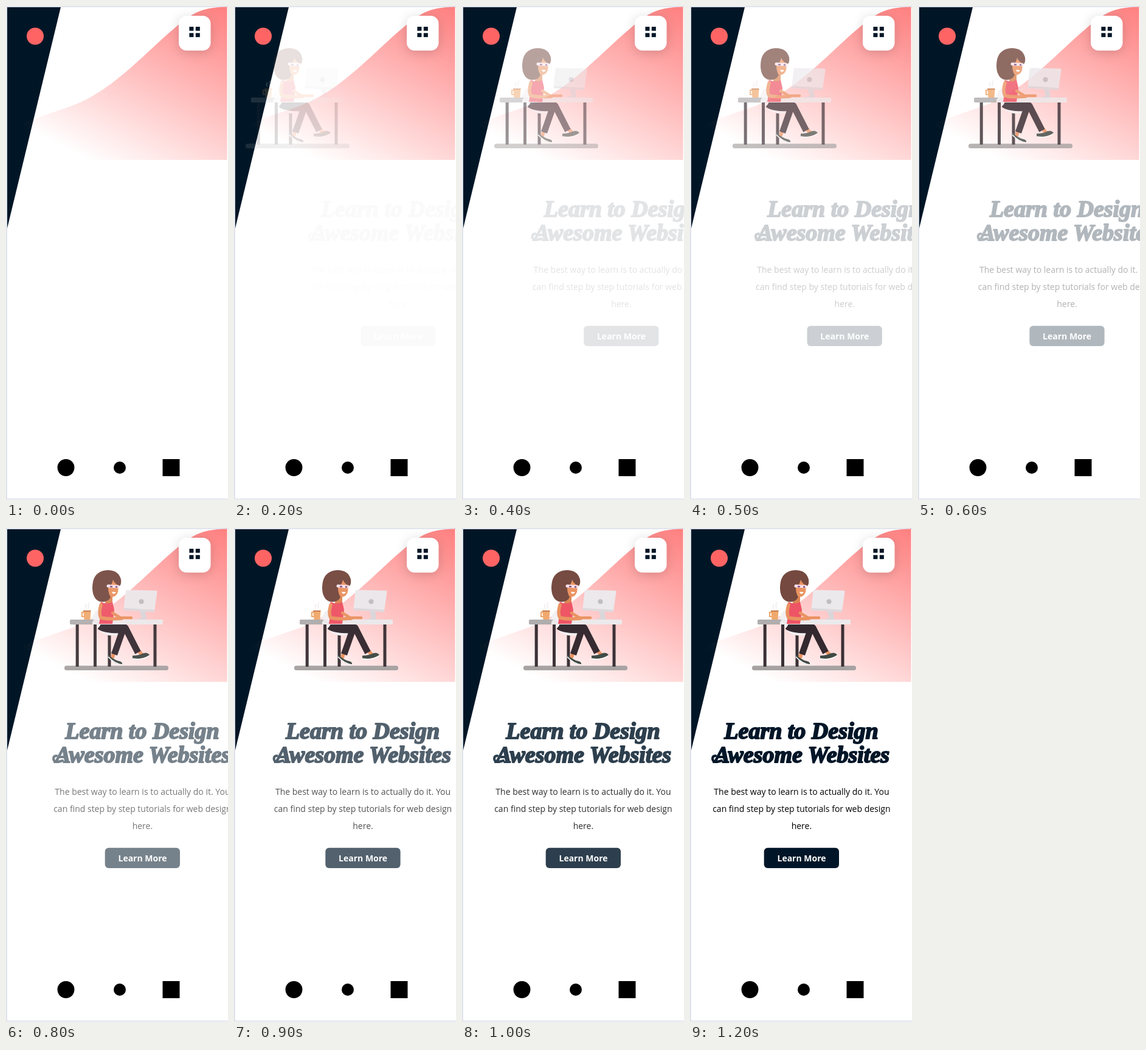
Recreate the animation shown at these times as an HTML page without scripts. Size 365x809 px, loop 3500 ms.

```html
<!DOCTYPE html>
<html lang="en">
<head>
<meta charset="utf-8">
<title>Learn to Design</title>
<style>
  @property --art { syntax: "<number>"; inherits: true; initial-value: 0; }
  @property --copy { syntax: "<number>"; inherits: true; initial-value: 0; }

  html, body { margin: 0; width: 100%; height: 100%; overflow: hidden; background: #fff; }
  svg { display: block; width: 100%; height: 100%; animation: enter 3500ms step-end infinite; }

  /* Both parts fade in while sliding; progress advances every 100 ms. */
  .art  { opacity: var(--art);  transform: translateX(calc((var(--art) - 1) * 100px)); }
  .copy { opacity: var(--copy); transform: translateX(calc((1 - var(--copy)) * 88px)); }

  @keyframes enter {
    0%     { --art: 0;    --copy: 0; }
    5.71%  { --art: .17;  --copy: .016; }
    8.57%  { --art: .34;  --copy: .054; }
    11.42% { --art: .51;  --copy: .108; }
    14.28% { --art: .68;  --copy: .195; }
    17.14% { --art: .81;  --copy: .3; }
    20%    { --art: .885; --copy: .412; }
    22.85% { --art: .94;  --copy: .534; }
    25.71% { --art: .97;  --copy: .675; }
    28.57% { --art: .99;  --copy: .818; }
    31.42% { --art: .997; --copy: .935; }
    34.28%, 100% { --art: 1; --copy: 1; }
  }

  text { text-anchor: middle; font-family: "Open Sans", "Noto Sans", sans-serif; font-size: 14px; }
  .title text {
    font: italic bold 38px "Liberation Serif", "Times New Roman", serif;
    fill: #001628; stroke: #001628; stroke-width: 2px; stroke-linejoin: round;
  }
  .swash { fill: none; stroke: #001628; stroke-width: 4; stroke-linecap: round; }
  .label { fill: #fff; font-weight: 700; }
  .card { fill: #fff; filter: drop-shadow(0 3px 9px rgba(0, 0, 0, .16)); }
  .limb { fill: none; stroke-linecap: round; stroke-linejoin: round; }
  .skin { stroke: #ea9360; }
  .trousers { stroke: #33292f; stroke-width: 10.5; stroke-linecap: butt; }
</style>
</head>
<body>
<svg viewBox="0 0 365 809" preserveAspectRatio="none">
  <defs>
    <linearGradient id="blush" gradientUnits="userSpaceOnUse" x1="130" y1="250" x2="276" y2="-42">
      <stop offset="0" stop-color="#ff6464" stop-opacity="0"/>
      <stop offset="1" stop-color="#ff6464" stop-opacity=".82"/>
    </linearGradient>
    <rect id="dot" width="7" height="6.6"/>
    <rect id="post" y="157" width="5" height="70"/>
  </defs>

  <!-- Backdrop -->
  <rect width="365" height="809" fill="#fff"/>
  <path d="M365 1H1V807.5H365" fill="none" stroke="#d9dce8" stroke-width="1.6"/>
  <path d="M2 2H90L2 364Z" fill="#001626"/>
  <path d="M22 196C52 181 86 172 112 162C190 132 252 48 307 14C321 5.500 340 1.500 363.500 1.500V252H22Z" fill="url(#blush)"/>
  <circle cx="48" cy="49.500" r="14" fill="#ff6464"/>

  <!-- Desk scene -->
  <g class="art">
    <rect x="102" y="225.5" width="171" height="7.5" rx="3.5" fill="#a7a2a2"/>
    <g fill="#3a3035">
      <use href="#post" x="120.700"/>
      <use href="#post" x="150"/>
      <use href="#post" x="173.500"/>
      <use href="#post" x="248.500"/>
    </g>

    <!-- Chair -->
    <path d="M146 157Q148 138 158 133L166 157H194L190 176H176Q158 173 155 158Z" fill="#f3f0f2"/>

    <!-- Legs and shoes -->
    <path class="limb skin" d="M184 203L181 212M224 201L230 208" stroke-width="6"/>
    <path class="limb trousers" d="M160 161Q168 168 198 167L184 207M160 161Q166 164 202 163L223 204"/>
    <path d="M174 207Q183 216 192 218Q198 219 197 224Q186 224 174 212Z" fill="#3f4a45"/>
    <path d="M174 211Q184 222 197 224" fill="none" stroke="#fff" stroke-width="1.5"/>
    <path d="M214 209Q224 209 232 205Q239 203 242 208Q230 216 214 214Z" fill="#3f4a45"/>
    <path d="M214 214Q230 217 242 209" fill="none" stroke="#fff" stroke-width="1.5"/>

    <!-- Monitor -->
    <path d="M225 134H235L237 150H221L229 147Z" fill="#d9d6da"/>
    <path d="M204.500 101.500L253 102.500Q255 103 254.500 105L250 136Q249.500 138 247 137.500L201 134.500Q199 134 199.500 132L202.500 103.500Q203 101.500 204.500 101.500Z" fill="#ece9ec"/>
    <path d="M200 131L250 134L249.500 137.500L200 134.500Z" fill="#dcd8dc"/>
    <circle cx="228.500" cy="120.500" r="4" fill="#c1bec2"/>

    <!-- Desktop -->
    <rect x="111" y="150" width="153" height="8" rx="2" fill="#eceaec"/>
    <path d="M113 150H151Q147 153 148 158H113Q111 158 111 156V152Q111 150 113 150Z" fill="#b0adae"/>

    <!-- Mug -->
    <path d="M134 138H131V145H135" fill="none" stroke="#eda466" stroke-width="2"/>
    <path d="M133 135H145.500L144.500 150H134.500Z" fill="#f0a96d"/>
    <path d="M133 135H145.500L145.300 137H133.200Z" fill="#c87a4a"/>
    <path d="M138 132Q135 128 138 125M142 131Q140 126 143 122" fill="none" stroke="#f3eeee" stroke-width="2"/>

    <!-- Woman -->
    <path d="M170 110H181V124H169Z" fill="#dc8553"/>
    <path d="M162 121Q173 126 181 121L184 134L181 157H159Q162 143 160 126Z" fill="#ee5465"/>
    <path class="limb skin" d="M181 139L194 147H212" stroke-width="4.500"/>
    <path class="limb skin" d="M162 126Q158 140 162 147Q176 150 196 148" stroke-width="5.500"/>
    <path d="M172 86H188Q192 95 190 105Q187 113 180 113Q171 110 170 99Z" fill="#ea9360"/>
    <path d="M173 69Q191 69 195 84Q196 92 193 95Q185 92 182 85Q180 94 174 98Q174 107 178 113Q174 121 165 121Q153 121 149 107Q147 98 149 88Q153 70 173 69Z" fill="#75493f"/>
    <path d="M174 95L190 96" stroke="#f7dfe8" stroke-width="5" stroke-linecap="round"/>
    <path d="M177 96H181M186 96.500H189" stroke="#835084" stroke-width="2.500"/>
    <path d="M180 104.500L187 105Q185 109 181 107Z" fill="#fff"/>
  </g>

  <!-- Menu button -->
  <rect class="card" x="284" y="16" width="52.500" height="57" rx="13"/>
  <g fill="#001626">
    <use href="#dot" x="301.400" y="34"/>
    <use href="#dot" x="311.800" y="34"/>
    <use href="#dot" x="301.400" y="44.300"/>
    <use href="#dot" x="311.800" y="44.300"/>
  </g>

  <!-- Headline and call to action -->
  <g class="copy">
    <g class="title">
      <text x="183" y="345">Learn to Design</text>
      <text x="184" y="384">Awesome Websites</text>
      <path class="swash" d="M52 381Q38 386 37 378Q37 373 42 373"/>
    </g>
    <text x="183.400" y="437">The best way to learn is to actually do it. You</text>
    <text x="183.400" y="465">can find step by step tutorials for web design</text>
    <text x="183.400" y="493">here.</text>
    <rect x="121.700" y="523.800" width="123.300" height="33.200" rx="6" fill="#001628"/>
    <text class="label" x="183.500" y="545.500">Learn More</text>
  </g>

  <!-- Footer links -->
  <circle cx="98.500" cy="756" r="14"/>
  <circle cx="187" cy="756" r="10"/>
  <rect x="257.500" y="742" width="28" height="28"/>
</svg>
</body>
</html>
```
